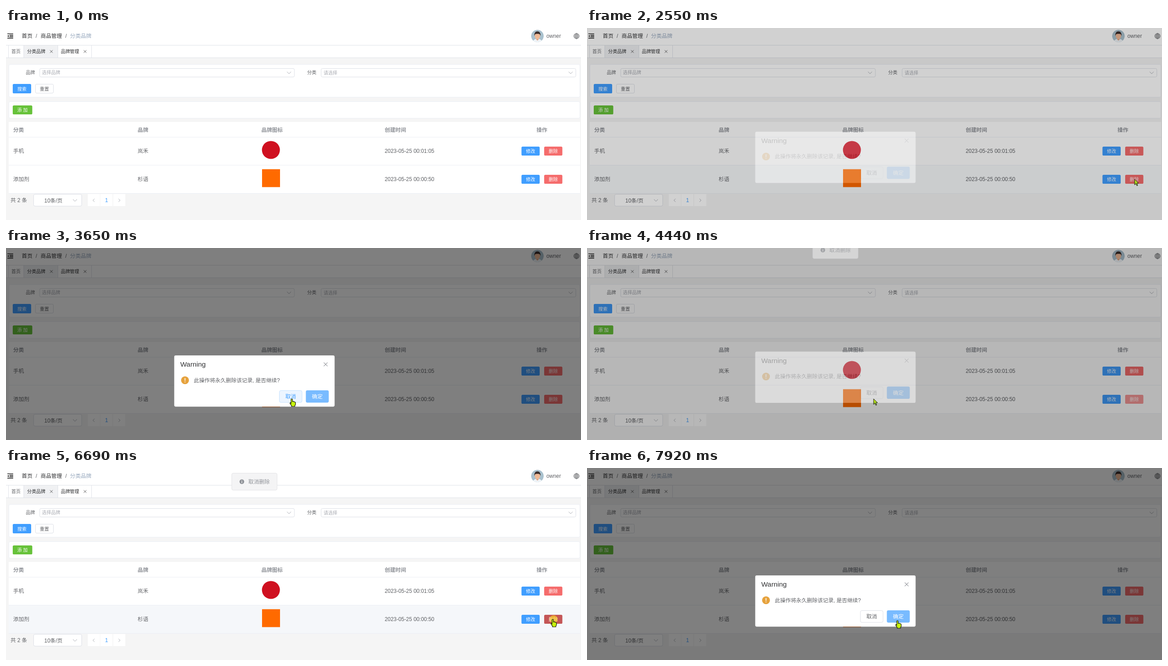
Animation of 1280 by 429 pixels, one loop 7.99 s. Source, as an HTML page:

```html
<!DOCTYPE html>
<html lang="zh">
<head>
<meta charset="utf-8">
<style>
html, body { margin: 0; width: 100%; height: 100%; overflow: hidden; background: #f5f5f5; }
svg { position: absolute; left: 0; top: 0; width: 1280px; height: 429px; overflow: hidden; }
text { font: 11.9px "Liberation Sans", "Noto Sans CJK SC", sans-serif; fill: #606266; white-space: pre; }
.s { font-size: 10.2px; }
.mid { text-anchor: middle; }
.dark { fill: #303133; }
.hint { fill: #a8abb2; }
.head { fill: #909399; font-weight: 700; }
.on { fill: #fff; font-weight: 500; }
.box { fill: #fff; stroke: #dcdfe6; }
.card { fill: #fff; stroke: #ebeef5; }
.line { fill: none; stroke: #a8abb2; }
.rule { fill: none; stroke: #ebeef5; }
.blue { fill: #409eff; }
.red { fill: #f56c6c; }
#page { z-index: 1; }
#msg { z-index: 2; }
#mask { z-index: 3; }
#mouse { z-index: 5; }
</style>
</head>
<body>
<svg id="page" viewBox="0 0 1280 429">
  <defs>
    <path id="down" class="line" d="M-4.5-2.2 0 2.2 4.5-2.2"/>
    <path id="cross" d="M-3-3 3 3M3-3-3 3"/>
    <clipPath id="round"><circle r="14"/></clipPath>
  </defs>
  <rect width="1280" height="429" fill="#f5f5f5"/>

  <!-- header and tabs -->
  <rect width="1280" height="66" fill="#fff"/>
  <path d="M0 38.5H1280M0 66.5H1280" stroke="#dfe2e8"/>
  <path d="M3 13H16M8 16.3H16M8 19.4H16M3 22.7H16" stroke="#222" stroke-width="1.7"/>
  <path d="M3 17.9 6.3 15.4V20.4Z" fill="#222"/>
  <text class="dark" x="35" y="22.3">首页</text>
  <text x="66" y="22.3">/</text>
  <text class="dark" x="77" y="22.3">商品管理</text>
  <text x="132" y="22.3">/</text>
  <text x="142.500" y="22.3" style="fill:#97a8be">分类品牌</text>
  <g transform="translate(1183 18)" clip-path="url(#round)">
    <circle r="14" fill="#a9c1ce"/>
    <path d="M-11 14Q-9 7-3 6.500H3Q9 7 11 14Z" fill="#eef3f7"/>
    <path d="M-2.500 4H2.500V8L0 10-2.500 8Z" fill="#dda27f"/>
    <ellipse cy="-.5" rx="6" ry="7.500" fill="#efb996"/>
    <path d="M-6.800 0Q-8-10 0-10.500 8-10 6.800 0L5.500-4Q0-6-5.500-4Z" fill="#3a2d2b"/>
  </g>
  <text x="1203" y="22">owner</text>
  <g transform="translate(1270 18)" fill="none" stroke="#606266" stroke-width=".9">
    <circle r="6"/><ellipse rx="2.800" ry="6"/><path d="M-6 0H6M-5.200-3H5.200M-5.200 3H5.200M0-6V6"/>
  </g>
  <rect x="40" y="39" width="75" height="27" fill="#f0f1f3"/>
  <path d="M5.500 39V66M39.500 39V66M115.500 39V66M190.500 39V66" stroke="#dfe2e8"/>
  <text class="s" x="12" y="56">首页</text>
  <text class="s dark" x="47" y="56">分类品牌</text>
  <text class="s dark" x="122" y="56">品牌管理</text>
  <g stroke="#555"><use href="#cross" x="101" y="52.500"/><use href="#cross" x="176" y="52.500"/></g>

  <!-- search form -->
  <rect class="card" x="6.500" y="81.500" width="1271" height="73" rx="3"/>
  <text class="s" x="44" y="103">品牌</text>
  <rect class="box" x="75" y="90.500" width="567" height="19" rx="3"/>
  <text class="s hint" x="80" y="103">选择品牌</text>
  <use href="#down" x="630" y="100"/>
  <text class="s" x="670.500" y="103">分类</text>
  <rect class="box" x="701.500" y="90.500" width="567" height="19" rx="3"/>
  <text class="s hint" x="707" y="103.500">请选择</text>
  <use href="#down" x="1257" y="100"/>
  <rect class="blue" x="15" y="125" width="41" height="21" rx="2.600"/>
  <text class="s on mid" x="35.500" y="139.500">搜索</text>
  <rect class="box" x="65.500" y="125.500" width="40" height="20" rx="2.600"/>
  <text class="s mid" x="85.500" y="139.500">重置</text>
  <rect class="card" x="6.500" y="164.500" width="1271" height="37" rx="3"/>
  <rect x="15" y="173" width="43.500" height="20" rx="2.600" fill="#67c23a"/>
  <text class="s on mid" x="36.700" y="187">添 加</text>

  <!-- table -->
  <rect x="6" y="210" width="1272" height="159.500" fill="#fff"/>
  <rect id="row" x="6" y="307" width="1272" height="62" fill="#f5f7fa"/>
  <path class="rule" d="M6 244H1278M6 306.500H1278M6 369.500H1278"/>
  <text class="head" x="16" y="231.500">分类</text>
  <text class="head" x="293" y="231.500">品牌</text>
  <text class="head" x="568.500" y="231.500">品牌图标</text>
  <text class="head" x="843" y="231.500">创建时间</text>
  <text class="head" x="1181" y="231.500">操作</text>
  <text x="16" y="279.300">手机</text>
  <text x="293" y="279.300">岚禾</text>
  <circle cx="589.700" cy="272.500" r="20" fill="#cf1020"/>
  <text x="843" y="279">2023-05-25 00:01:05</text>
  <text x="16" y="342.300">添加剂</text>
  <text x="293" y="342.300">杉语</text>
  <rect x="570" y="315.500" width="40" height="40" fill="#ff6a00"/>
  <text x="843" y="342">2023-05-25 00:00:50</text>
  <g id="acts"></g>

  <!-- pagination -->
  <text x="10" y="389">共 2 条</text>
  <rect class="box" x="61.500" y="371.500" width="107" height="26.500" rx="3.400"/>
  <text class="mid" x="105.500" y="389.500">10条/页</text>
  <use href="#down" x="153.500" y="385"/>
  <path d="M182 371H209V398H182ZM210 371H237V398H210ZM238.500 371H265.500V398H238.500Z" fill="#fff"/>
  <path class="line" d="M197 381.500 193.500 385 197 388.500M250.500 381.500 254 385 250.500 388.500"/>
  <text class="mid blue" x="223.700" y="389" style="fill:#409eff">1</text>
</svg>

<svg id="msg" viewBox="0 0 1280 429">
  <g id="tip">
    <rect x="502.500" y="11.500" width="101" height="38" rx="3.400" fill="#f4f4f5" stroke="#e3e3e6"/>
    <circle cx="525" cy="30.500" r="5.200" fill="#909399"/>
    <path d="M525 29.700V33.500M525 27.200V28.500" stroke="#fff" stroke-width="1.300"/>
    <text x="539.500" y="35" style="fill:#909399">取消删除</text>
  </g>
</svg>

<svg id="mask" viewBox="0 0 1280 429">
  <rect width="1280" height="429" fill="#000" fill-opacity=".5"/>
  <g id="dialog">
    <rect x="374.500" y="240" width="357" height="114.500" rx="3.400" fill="#fff"/>
    <text class="dark" x="388" y="265" style="font-size:15.3px">Warning</text>
    <use href="#cross" transform="translate(711.500 260) scale(1.4)" stroke="#909399" stroke-width=".75"/>
    <circle cx="398.500" cy="295.500" r="8.700" fill="#e6a23c"/>
    <path d="M398.500 290.500V296.800M398.500 298.500V300.300" stroke="#fff" stroke-width="1.700"/>
    <text x="418" y="299.500">此操作将永久删除该记录, 是否继续?</text>
    <rect id="no" x="608.500" y="318.500" width="50.500" height="26.500" rx="3.400"/>
    <text id="noText" class="mid" x="633.800" y="336">取消</text>
    <rect id="yes" x="667.500" y="318" width="51" height="27.500" rx="3.400"/>
    <text class="mid on" x="693" y="336">确定</text>
  </g>
</svg>

<svg id="mouse" viewBox="0 0 1280 429">
  <defs>
    <linearGradient id="lime" x2="0" y2="1"><stop stop-color="#dcf020"/><stop offset="1" stop-color="#78b81a"/></linearGradient>
  </defs>
  <g id="cursor">
    <circle id="ring" r="9" fill="#ffdc1e" fill-opacity=".6"/>
    <path id="arrow" d="M0 0V12.500L3 9.800 5 14.500 7 13.600 5 9 9 8.800Z" fill="url(#lime)" stroke="#1b1b1b"/>
    <path id="hand" d="M-3.500 1.500Q-3.500 0-2 0-.3 0-.3 1.500V6Q1 5 2.300 6.200 3.600 5.800 4.400 7 6.400 6.800 6.500 9V12Q6.300 14 5 15.200V17H-2.500V15.500L-5.500 11Q-6.500 9-5 8.600-4.200 8.800-3.500 10Z" fill="#c6f20c" stroke="#111" stroke-width="1.200"/>
  </g>
</svg>

<script>
const $ = id => document.getElementById(id);
const LOOP = 7990, OPEN1 = 2465, CLOSE = 4350, OPEN2 = 6835, GONE = 7360;

// Screen updates arrive in bursts: first, last, count.
const bursts = [
  [590, 930, 6], [1120, 1880, 12], [1950, 1950, 1], [2280, 2760, 8], [2950, 3650, 11],
  [4040, 4110, 2], [4370, 5110, 12], [5190, 5960, 12], [6690, 7100, 7], [7290, 7920, 10]
];
// Pointer strokes: start, end, then three points of a quadratic curve.
const strokes = [
  [500, 930, 800, 434, 818, 370, 829, 343],
  [1050, 1880, 829, 343, 1050, 347, 1219, 338],
  [2880, 3650, 1220, 337, 930, 425, 638, 337],
  [4600, 5110, 638, 338, 790, 352, 929, 350],
  [5120, 5960, 929, 350, 1185, 356, 1219, 338],
  [7220, 7920, 1219, 338, 957, 411, 693, 341]
];

$('acts').innerHTML = [265, 328].map(y => [[1147.5, 'blue', '修改'], [1198, 'red', '删除']].map(([x, c, label]) =>
  `<rect class="${c}" x="${x}" y="${y}" width="40.500" height="20" rx="2.600"/>` +
  `<text class="s on mid" x="${x + 20.2}" y="${y + 14}">${label}</text>`).join('')).join('');
const [edit, del] = [...$('acts').querySelectorAll('rect')].slice(2);

const clamp = x => Math.min(1, Math.max(0, x));
const smooth = x => x * x * (3 - 2 * x);
const within = (t, a, b) => t >= a && t < b;
const show = (el, on) => el.style.visibility = on ? 'visible' : 'hidden';
const hit = (el, x, y) => {
  const b = el.getBBox();
  return within(x, b.x, b.x + b.width) && within(y, b.y, b.y + b.height);
};

// CSS "ease" curve
function ease(x) {
  x = clamp(x);
  let lo = 0, hi = 1, u = .5;
  for (let i = 0; i < 18; i++) {
    u = (lo + hi) / 2;
    if (.75 * u * (1 - u) + u ** 3 < x) lo = u; else hi = u;
  }
  return .3 * u * (1 - u) ** 2 + 3 * u * u * (1 - u) + u ** 3;
}

function hold(t) {
  let held = 0;
  for (const [a, b, n] of bursts) {
    if (t < a) break;
    const d = (b - a) / (n - 1) || 1;
    held = Math.min(b, a + Math.floor((t - a) / d + .1) * d);
  }
  return held;
}

function pointer(t) {
  const [a, b, x0, y0, cx, cy, x1, y1] = strokes.filter(s => t >= s[0]).pop() || strokes[0];
  const u = smooth(clamp((t - a) / (b - a))), v = 1 - u;
  const mix = (p, q, r) => v * v * p + 2 * u * v * q + u * u * r;
  return [mix(x0, cx, x1), mix(y0, cy, y1)];
}

function render(t) {
  const [x, y] = pointer(t);
  const masked = within(t, OPEN1, CLOSE) || t >= OPEN2;
  const closing = within(t, CLOSE, OPEN2);
  const start = t < OPEN2 ? OPEN1 : OPEN2;

  const veil = closing ? 1 - clamp((t - CLOSE) / 200) : clamp((t - start) / 250);
  const rise = closing ? 1 - ease((t - CLOSE) / 300) : ease((t - start) / 300);
  $('mask').style.opacity = veil;
  $('dialog').setAttribute('opacity', rise);
  $('dialog').setAttribute('transform', `translate(0 ${-17 * (1 - rise)})`);

  const enter = t < GONE;
  const part = d => enter ? ease((t - CLOSE) / d) : 1 - ease((t - GONE) / d);
  $('tip').setAttribute('opacity', part(300));
  $('tip').setAttribute('transform', `translate(0 ${-39 * (1 - part(400))})`);
  $('msg').style.zIndex = t < OPEN2 ? 4 : 2;

  const inRow = within(y, 307, 369) && !within(t, CLOSE, 4640);
  $('row').setAttribute('opacity', t < 590 || !inRow ? 0 : masked ? 1 - veil : 1);

  const pressed = within(t, 2280, OPEN1) || within(t, 6690, OPEN2);
  const lit = within(t, 1950, OPEN1) || closing;
  del.style.fill = pressed ? '#c45656' : lit ? '#f89898' : '#f56c6c';
  const onEdit = !masked && hit(edit, x, y);
  edit.style.fill = onEdit ? '#79bbff' : '#409eff';

  const onNo = masked && hit($('no'), x, y);
  const cancelled = within(t, 4040, OPEN2);
  $('no').style.fill = onNo ? '#ecf5ff' : '#fff';
  $('no').style.stroke = onNo ? (cancelled ? '#409eff' : '#c6e2ff') : '#dcdfe6';
  $('noText').style.fill = onNo ? '#409eff' : '#606266';
  $('yes').style.fill = cancelled ? '#409eff' : '#79bbff';

  const hand = masked ? onNo || hit($('yes'), x, y) : onEdit || hit(del, x, y);
  const seen = t >= 590;
  show($('hand'), seen && hand);
  show($('arrow'), seen && !hand);
  show($('ring'), within(t, 2280, 2400) || within(t, 4040, 4100) || within(t, 6690, 6800));
  $('cursor').setAttribute('transform', `translate(${x} ${y})`);
}

const born = performance.now();
(function tick() {
  render(hold((performance.now() - born) % LOOP));
  requestAnimationFrame(tick);
})();
</script>
</body>
</html>
```
